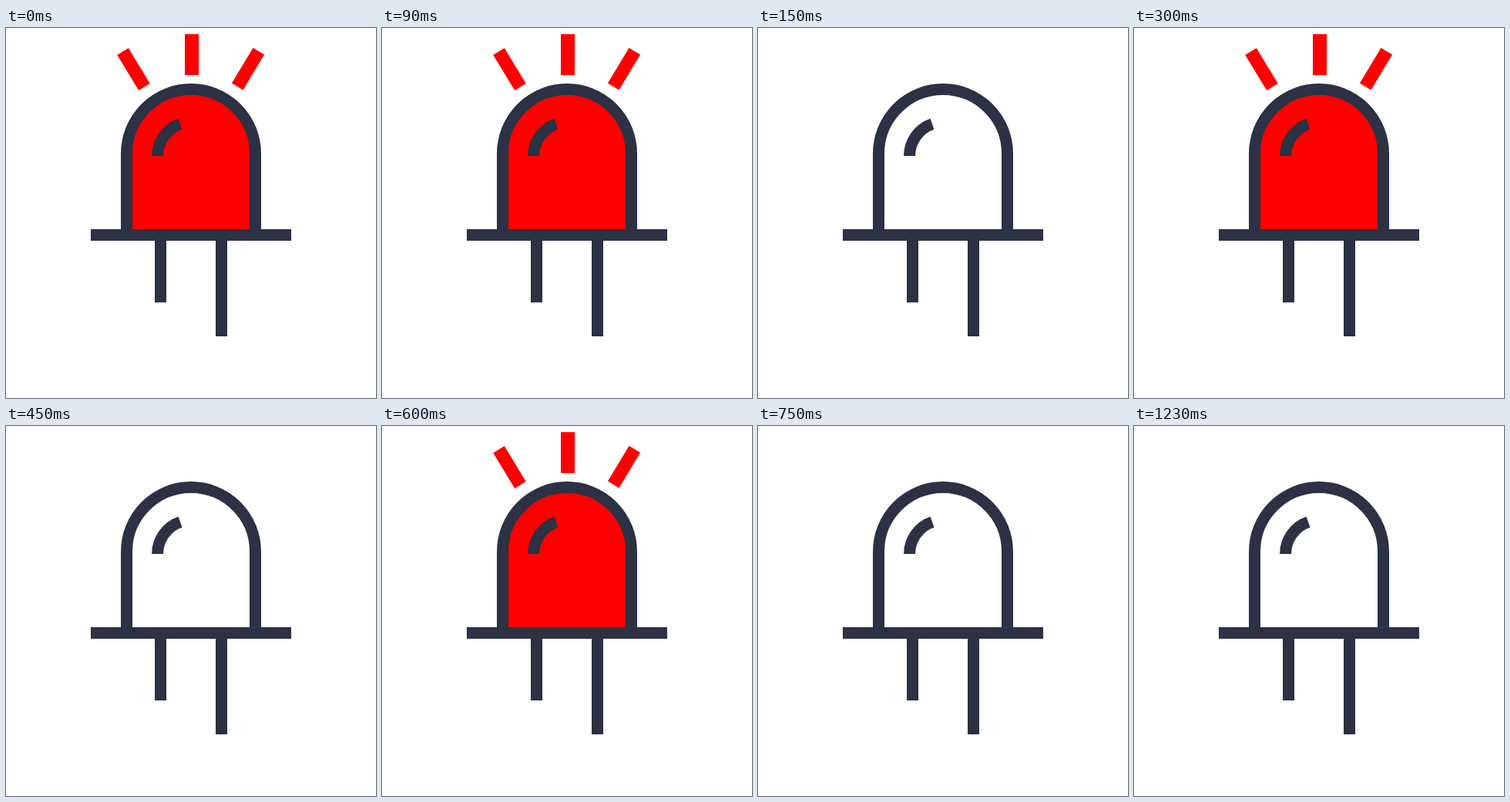
Write an HTML page that moves like this. It is 480 by 480 pixels and loops after 1.55 s.

```html
<!DOCTYPE html>
<html lang="en">
<head>
<meta charset="utf-8">
<title>Blinking LED</title>
<style>
  html, body { margin: 0; height: 100%; overflow: hidden; background: #fff; }
  svg { display: block; width: 100vw; height: 100vh; }
</style>
</head>
<body>
<svg viewBox="0 0 480 480" fill="none">
  <g id="light" stroke="#f00">
    <path d="M157 268V163a83 83 0 0 1 166 0V268z" fill="#f00" stroke="none"/>
    <path d="M241 8V61" stroke-width="18"/>
    <path d="M151.5 30.5L179.5 76.5M327.8 30.2L300.2 76" stroke-width="17"/>
  </g>
  <g stroke="#2c3143" stroke-width="15">
    <path d="M156.5 268V163a83.5 83.5 0 0 1 167 0V268"/>
    <path d="M196.5 166A44 44 0 0 1 226 124.5"/>
    <path d="M110 268.5H370M200.5 268V356M279.5 268V400"/>
  </g>
</svg>
<script>
  const LOOP = 1550, STEP = 150, BLINK_END = 750;
  const light = document.getElementById('light');

  function draw(now) {
    const t = now % LOOP;
    const lit = t < BLINK_END && Math.floor(t / STEP) % 2 === 0;
    light.style.display = lit ? '' : 'none';
  }

  let start;
  function tick(now) {
    start ??= now;
    draw(now - start);
    requestAnimationFrame(tick);
  }
  requestAnimationFrame(tick);
</script>
</body>
</html>
```
